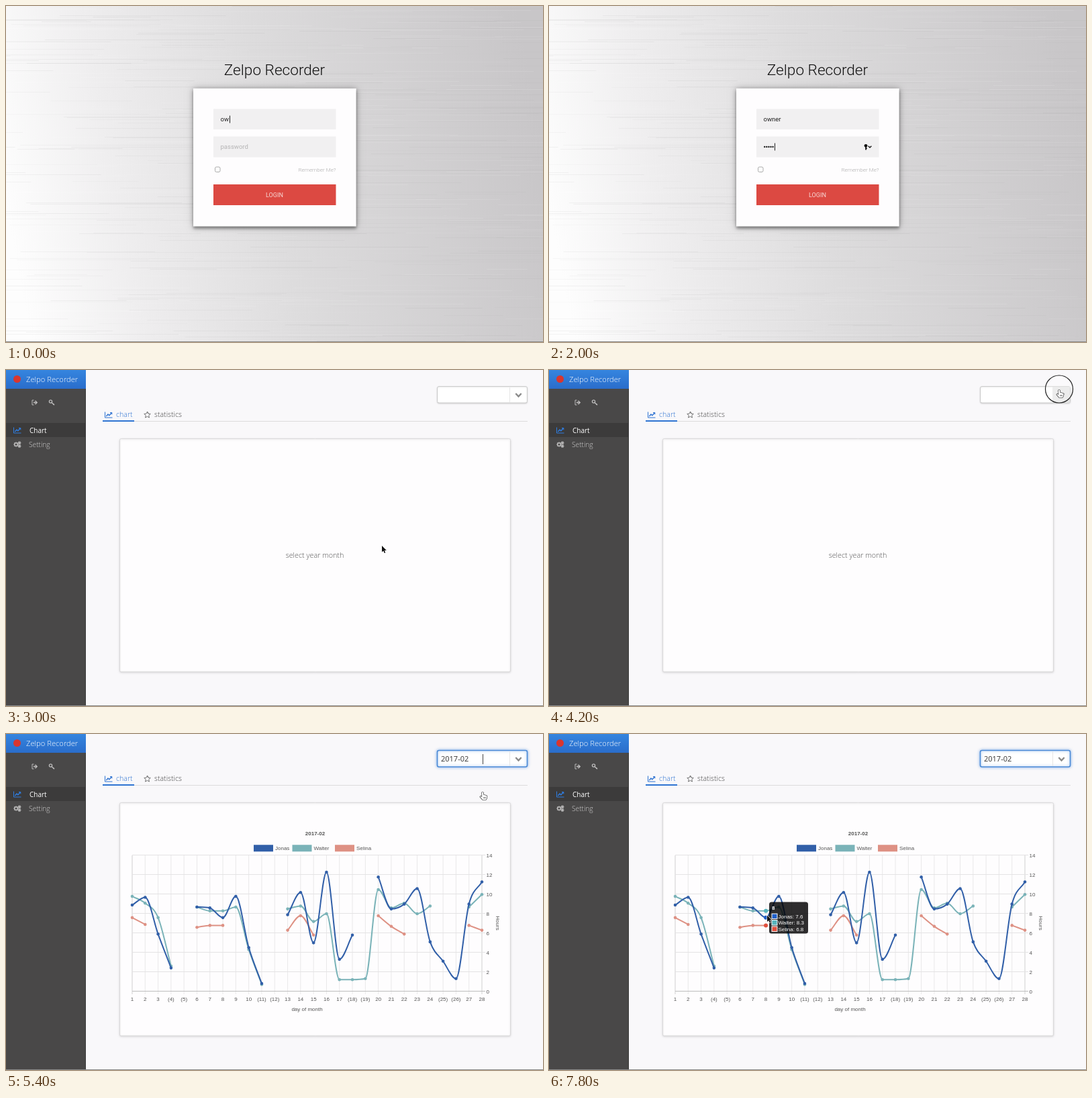
These frames come from a looping animation (800x501 px, 8 s). An HTML page with a canvas:

```html
<!DOCTYPE html>
<html lang="en">
<head>
<meta charset="utf-8">
<title>Zelpo Recorder</title>
<style>
html, body { margin: 0; width: 100%; height: 100%; overflow: hidden; background: #f9f9fa; }
canvas { display: block; }
</style>
</head>
<body>
<canvas id="stage" width="800" height="501"></canvas>
<script>
const ctx = document.getElementById('stage').getContext('2d');
const LOOP = 8000, STEP = 200, TAU = Math.PI * 2;
const APP = 'Zelpo Recorder', USER = 'owner', MONTH = '2017-02';
const ROBOTO = 'Roboto, sans-serif', OPEN = '"Open Sans", sans-serif';
const ARIAL = '"Liberation Sans", Arial, sans-serif';

const rect = (x, y, w, h, fill) => { ctx.fillStyle = fill; ctx.fillRect(x, y, w, h); };

function box(x, y, w, h, r, fill, stroke, lw = 1) {
  ctx.beginPath();
  ctx.roundRect(x, y, w, h, r);
  if (fill) { ctx.fillStyle = fill; ctx.fill(); }
  if (stroke) { ctx.strokeStyle = stroke; ctx.lineWidth = lw; ctx.stroke(); }
}

function text(s, x, y, font, fill, align = 'left') {
  ctx.font = font;
  ctx.fillStyle = fill;
  ctx.textAlign = align;
  ctx.fillText(s, x, y);
  return ctx.measureText(s).width;
}

function line(points, color, lw = 1) {
  ctx.beginPath();
  for (let i = 0; i < points.length; i += 2) ctx.lineTo(points[i], points[i + 1]);
  ctx.strokeStyle = color;
  ctx.lineWidth = lw;
  ctx.stroke();
}

function dot(x, y, r, fill, stroke, lw = 1) {
  ctx.beginPath();
  ctx.arc(x, y, r, 0, TAU);
  if (fill) { ctx.fillStyle = fill; ctx.fill(); }
  if (stroke) { ctx.strokeStyle = stroke; ctx.lineWidth = lw; ctx.stroke(); }
}

function shadow(color, blur, dy = 0) {
  ctx.shadowColor = color;
  ctx.shadowBlur = blur;
  ctx.shadowOffsetY = dy;
}
const noShadow = () => shadow('transparent', 0);

// Linear interpolation through rows of [time, ...values]
function track(keys, t) {
  let i = 0;
  while (i < keys.length - 2 && t > keys[i + 1][0]) i++;
  const a = keys[i], b = keys[i + 1];
  const k = Math.min(1, Math.max(0, (t - a[0]) / (b[0] - a[0])));
  return a.slice(1).map((v, j) => v + (b[j + 1] - v) * k);
}

// ---- Login ----

function brushed() {
  const g = ctx.createLinearGradient(0, 300, 790, 150);
  g.addColorStop(0, '#fdfdfd');
  g.addColorStop(0.2, '#efeeef');
  g.addColorStop(0.5, '#dddcdd');
  g.addColorStop(1, '#c8c6c8');
  rect(0, 0, 800, 501, g);
  let seed = 11;
  const rnd = () => (seed = seed * 16807 % 2147483647) / 2147483647;
  for (let i = 0; i < 420; i++) {
    const shade = rnd() < 0.5 ? 255 : 150;
    rect(rnd() * 900 - 150, Math.floor(rnd() * 500), 60 + rnd() * 260, 1,
      `rgba(${shade},${shade},${shade},${0.03 + rnd() * 0.09})`);
  }
}

function login(t) {
  brushed();
  text(APP, 400, 103, '300 22.6px ' + ROBOTO, '#111', 'center');
  shadow('rgba(0,0,0,.3)', 10);
  rect(279, 123, 242.5, 205.5, '#fff');
  shadow('rgba(0,0,0,.35)', 4, 3);
  rect(279, 123, 242.5, 205.5, '#fefdfe');
  noShadow();
  rect(309, 153.5, 182.5, 30.5, '#f1f0f1');
  rect(309, 194.5, 182.5, 31, '#f1f0f1');

  const font = '400 9.5px ' + ROBOTO;
  const typed = t < 200 ? 2 : t < 400 ? 3 : 5;
  const inPass = t >= 800;
  const w = text(USER.slice(0, typed), 319.5, 172, font, '#222');
  let caretX = 320 + w, caretY = 163.5;
  if (inPass) {
    const dots = t < 1000 ? 0 : t < 1200 ? 1 : Math.min(5, (t - 600) / 200);
    for (let i = 0; i < dots; i++) dot(321.2 + i * 3.1, 210, 1.2, '#222');
    caretX = 320 + dots * 3.1;
    caretY = 204.5;
    keyBadge();
    if (!dots) text('password', 319.5, 213, font, '#b5b4b5');
  } else {
    text('password', 319.5, 213, font, '#b5b4b5');
  }
  rect(Math.round(caretX), caretY, 1, 11, '#222');

  box(311.5, 240, 7.5, 7.5, 2, '#fff', '#aaa');
  text('Remember Me?', 491.5, 246.7, '300 8.1px ' + ROBOTO, '#aaa9aa', 'right');
  rect(309, 266, 182.5, 31, '#dc4942');
  text('LOGIN', 400, 285, '400 9.1px ' + ROBOTO, '#f8d9d7', 'center');
}

function keyBadge() {
  dot(472, 208.3, 2.4, '#111');
  rect(471.2, 209, 1.8, 5.5, '#111');
  rect(472.5, 211.6, 1.4, 1.2, '#111');
  line([475.6, 208.8, 478, 211, 480.4, 208.8], '#111', 1.3);
}

function spinner(t) {
  rect(0, 0, 800, 501, '#f9f9fa');
  rect(390, 209, 20, 29, '#fff');
  const turn = (t - 2200) / STEP * 3;
  for (let i = 0; i < 12; i++) {
    const a = Math.PI / 2 - (i - turn) * TAU / 12;
    const c = Math.cos(a), s = Math.sin(a);
    line([400 + c * 4.6, 225 + s * 4.6, 400 + c * 8.8, 225 + s * 8.8],
      `rgba(0,0,0,${Math.max(0.2, 1 - i * 0.085)})`, 1.5);
  }
}

// ---- Dashboard ----

function chartIcon(x, y, c) {
  line([x, y, x, y + 8.5, x + 11, y + 8.5], c);
  line([x + 1.8, y + 6.5, x + 4.5, y + 3.5, x + 6.3, y + 5.2, x + 10, y + 1.3], c, 1.5);
  line([x + 7.5, y + 1, x + 10.3, y + 1, x + 10.3, y + 3.8], c);
}

function gear(x, y, r, c) {
  dot(x, y, r, null, c, 1.5);
  for (let i = 0; i < 8; i++) {
    const a = i * TAU / 8;
    rect(x + Math.cos(a) * (r + 1) - 0.5, y + Math.sin(a) * (r + 1) - 0.5, 1, 1, c);
  }
}

function star(x, y, r, c) {
  const pts = [];
  for (let i = 0; i <= 11; i++) {
    const a = i * TAU / 10 - Math.PI / 2, q = i % 2 ? r * 0.47 : r;
    pts.push(x + Math.cos(a) * q, y + Math.sin(a) * q);
  }
  line(pts, c, 0.9);
}

function sidebar() {
  rect(0, 0, 119, 501, '#494848');
  const g = ctx.createLinearGradient(0, 0, 0, 28);
  g.addColorStop(0, '#3585df');
  g.addColorStop(1, '#2a6dcb');
  rect(0, 0, 119, 28, g);
  rect(0, 79, 119, 21, '#3c3b3b');
  rect(118, 28, 1, 473, '#3a3a3a');
  dot(16.5, 13.5, 5.5, '#d9362f');
  text(APP, 30, 17.7, '300 11.2px ' + OPEN, '#fff');
  const c = '#bdbcbc';
  line([41.5, 45, 39, 45, 39, 52, 41.5, 52], c);
  line([41, 48.5, 46, 48.5], c, 1.8);
  line([43.5, 45.7, 46.3, 48.5, 43.5, 51.3], c, 1.3);
  dot(66.5, 47, 2.1, null, c, 1.3);
  line([68, 48.5, 72, 52.3], c, 1.4);
  line([70, 52, 71.4, 50.6], c);
  chartIcon(11.5, 85.5, '#2f7de0');
  text('Chart', 35, 93.5, '400 10px ' + OPEN, '#fff');
  gear(15, 111, 2.3, c);
  gear(20, 108.7, 1, c);
  gear(20, 113.5, 1, c);
  text('Setting', 34, 114.5, '300 10.2px ' + OPEN, '#d0cfcf');
}

function select(t) {
  const focus = t >= 4400;
  shadow(focus ? 'rgba(60,130,220,.55)' : 'rgba(0,0,0,.12)', focus ? 4 : 2, focus ? 0 : 1);
  box(642.5, 24.5, 134, 24.5, 2.5, '#fff', focus ? '#4b8ad6' : '#ccc', focus ? 1.6 : 1);
  noShadow();
  const hover = t >= 4000 && t < 4400;
  if (hover) rect(750, 25, 26, 23.5, '#e4e4e4');
  rect(750, 26, 1, 22, '#e6e6e6');
  line([759.3, 35, 763.5, 39.4, 767.7, 35], '#8c8c8c', 2.4);
  if (t >= 4800) text(MONTH, 648, 41, '400 11px ' + OPEN, '#333');
  if (t >= 4400 && t < 4800 || t === 5400) rect(710, 30, 1, 15, '#444');
}

function menu(t) {
  shadow('rgba(0,0,0,.2)', 4, 2);
  box(642.5, 51.5, 134, 104, 2.5, '#fff', '#ccc');
  noShadow();
  const over = t < 4600 ? 0 : 1;
  for (let i = 0; i < 4; i++) {
    const y = 52 + i * 26;
    if (i === over) rect(643, y, 133, 26, '#e8f0fa');
    text(i < 3 ? '2017-0' + (3 - i) : '2016-12', 648, y + 17, '400 11px ' + OPEN, '#444');
  }
}

function dashboard(t) {
  rect(0, 0, 800, 501, '#f9f8fa');
  sidebar();
  rect(144, 76, 633, 1, '#dcdbdc');
  rect(144, 75, 47, 2, '#2f74d2');
  chartIcon(147.5, 62.5, '#2f74d2');
  text('chart', 164, 70, '300 10.6px ' + OPEN, '#2f74d2');
  star(210.5, 67, 5, '#666');
  text('statistics', 221, 70, '300 10.6px ' + OPEN, '#444');
  shadow('rgba(0,0,0,.12)', 3, 1);
  box(169.5, 102.5, 582, 347.5, 2, '#fefdfe', '#dad9da');
  noShadow();
  if (t < 4800) text('select year month', 460, 280, '300 10.8px ' + OPEN, '#555', 'center');
  else chart(t);
  select(t);
  if (t >= 4400 && t < 4800) menu(t);
}

// ---- Chart ----

const series = [
  { name: 'Jonas', key: 369, color: '#315fa8', hot: '#1f5ec8', runs: [
    [1, 8.9, 9.7, 5.9, 2.4], [6, 8.7, 8.6, 7.6, 9.8, 4.5, 0.8],
    [13, 7.9, 10.2, 5, 12.3, 3.3, 5.8],
    [20, 11.8, 8.5, 9, 10.6, 5.1, 3.1, 1.3, 9, 11.3]] },
  { name: 'Walter', key: 426.5, color: '#7ab3b8', hot: '#56b4bd', runs: [
    [1, 9.8, 9.1, 7.6, 2.6], [6, 8.7, 8.3, 8.3, 8.7, 4.3, 0.7],
    [13, 8.5, 8.8, 7.2, 8, 1.2, 1.2, 1.3, 10.5, 8.6, 9.1, 8, 8.8],
    [27, 8.7, 10]] },
  { name: 'Selina', key: 490, color: '#de9184', hot: '#e0503e', runs: [
    [1, 7.6, 6.9], [6, 6.6, 6.8, 6.8], [13, 6.3, 7.8, 5.8],
    [20, 7.8, 6.7, 5.9], [27, 6.8, 6.3]] }
];
const OFF = [4, 5, 11, 12, 18, 19, 25, 26];
const DX = 521 / 27;
const dayX = d => 188 + (d - 1) * DX;
const hourY = v => 383.5 - v * 14.43;

function valueOn(s, day) {
  for (const [first, ...vals] of s.runs)
    if (day >= first && day < first + vals.length) return vals[day - first];
}

// Monotone cubic: flat at local extremes, limited slope elsewhere
function slopes(ys) {
  const d = ys.slice(1).map((y, i) => y - ys[i]);
  const m = ys.map((_, i) =>
    i === 0 ? d[0] : i === d.length ? d[i - 1] : d[i - 1] * d[i] <= 0 ? 0 : (d[i - 1] + d[i]) / 2);
  d.forEach((dk, i) => {
    if (!dk) { m[i] = m[i + 1] = 0; return; }
    const a = m[i] / dk, b = m[i + 1] / dk, q = a * a + b * b;
    if (q > 9) {
      const k = 3 / Math.sqrt(q);
      m[i] = a * k * dk;
      m[i + 1] = b * k * dk;
    }
  });
  return m;
}

function drawSeries(s, grow, day) {
  for (const [first, ...vals] of s.runs) {
    const ys = vals.map(v => hourY(v * grow)), m = slopes(ys);
    ctx.beginPath();
    ys.forEach((y, i) => {
      const x = dayX(first + i);
      if (!i) ctx.moveTo(x, y);
      else ctx.bezierCurveTo(x - DX * 2 / 3, ys[i - 1] + m[i - 1] / 3, x - DX / 3, y - m[i] / 3, x, y);
    });
    ctx.strokeStyle = s.color;
    ctx.lineWidth = 2;
    ctx.stroke();
    ys.forEach((y, i) => {
      const hot = first + i === day;
      dot(dayX(first + i), y, hot ? 3 : 2.3, hot ? s.hot : s.color);
    });
  }
}

function axes() {
  const font = '8px ' + ARIAL, ink = '#555';
  for (let d = 1; d <= 28; d++) {
    const x = dayX(d);
    line([x, 181, x, 388], d === 1 || d === 28 ? '#cfcfcf' : '#e9e8e9');
    text(OFF.includes(d) ? `(${d})` : d, x, 398, font, ink, 'center');
  }
  for (let v = 0; v <= 14; v += 2) {
    const y = Math.round(hourY(v)) - 0.5;
    line([188, y, 714, y], v ? '#e4e3e4' : '#bdbdbd');
    text(v, 715.5, y + 3, font, ink);
  }
  text('day of month', 448.5, 413, font, ink, 'center');
  ctx.save();
  ctx.translate(730, 282);
  ctx.rotate(Math.PI / 2);
  text('Hours', 0, 0, font, ink, 'center');
  ctx.restore();
  text(MONTH, 460.5, 151, 'bold 8px ' + ARIAL, ink, 'center');
  for (const s of series) {
    rect(s.key, 165.3, 29, 10, s.color);
    text(s.name, s.key + 32, 173, font, ink);
  }
}

// [time, left, middle of tooltip]
const tipPath = [[6400, 367, 319], [6600, 356.5, 279.5], [6800, 347.5, 250], [7200, 347.5, 250],
  [7400, 334, 267], [7600, 328, 274], [8000, 328, 274]];
const hoverDay = t => t < 6400 ? 0 : t < 6600 ? 10 : t < 7400 ? 9 : 8;

function tooltip(t, day) {
  const rows = series.filter(s => valueOn(s, day) !== undefined);
  const [x, mid] = track(tipPath, t);
  const h = 18.5 + rows.length * 9.5, y = mid - h / 2;
  const dark = 'rgba(0,0,0,.82)';
  box(x, y, 58, h, 3.5, dark);
  ctx.beginPath();
  ctx.moveTo(x, mid - 4);
  ctx.lineTo(x - 4, mid);
  ctx.lineTo(x, mid + 4);
  ctx.fill();
  text(day, x + 4, y + 11.5, 'bold 8px ' + ARIAL, '#fff');
  rows.forEach((s, i) => {
    const ry = y + 17 + i * 9.5;
    rect(x + 3.5, ry, 9, 8.5, '#fff');
    rect(x + 4.5, ry + 1, 7, 6.5, s.hot);
    text(`${s.name}: ${valueOn(s, day).toFixed(1)}`, x + 13.5, ry + 7, '8px ' + ARIAL, '#fff');
  });
}

function chart(t) {
  axes();
  const k = Math.min(1, (t - 4700) / 700), day = hoverDay(t);
  const grow = 1 - Math.pow(1 - k, 4);
  for (const s of [...series].reverse()) drawSeries(s, grow, day);
  if (day) tooltip(t, day);
}

// ---- Pointer ----

const pointerPath = [[3000, 560, 262], [3400, 632, 172], [3800, 738, 55], [4000, 760, 30], [4400, 760, 30],
  [4600, 722, 76], [4800, 710, 87], [5400, 710, 87], [5800, 620, 150], [6200, 420, 288],
  [6400, 361, 317], [6600, 343, 261], [7200, 343, 260], [7400, 328, 270], [7600, 325, 270.5], [8000, 325, 270.5]];

function shape(x, y, pts, fill, stroke) {
  ctx.beginPath();
  for (let i = 0; i < pts.length; i += 2) ctx.lineTo(x + pts[i], y + pts[i + 1]);
  ctx.closePath();
  ctx.lineJoin = 'round';
  ctx.strokeStyle = stroke;
  ctx.lineWidth = 1.2;
  ctx.stroke();
  ctx.fillStyle = fill;
  ctx.fill();
  ctx.lineJoin = 'miter';
}

function pointer(t) {
  const [x, y] = track(pointerPath, t);
  if (t === 4200 || t === 4800) dot(x, y - 1.5, 20.5, 'rgba(255,255,255,.3)', '#222', 1.2);
  if (t >= 4000 && t <= 5400) {
    shape(x, y, [-1, 0, 1, 0, 1.6, 4, 4, 4.2, 6.6, 5.2, 6.4, 8.5, 5, 11, 0, 11, -3.8, 6.5, -2.8, 5.6, -0.8, 7], '#fff', '#222');
    line([x + 2, y + 7, x + 2, y + 9.2], '#222', 0.8);
    line([x + 4, y + 7, x + 4, y + 9.2], '#222', 0.8);
  } else {
    shape(x, y, [0, 0, 0, 9.6, 2.2, 7.6, 3.7, 11, 5.3, 10.3, 3.8, 7, 6.8, 7], '#111', '#fff');
  }
}

function draw(t) {
  if (t < 2200) login(t);
  else if (t < 2800) spinner(t);
  else dashboard(t);
  if (t >= 3000) pointer(t);
  rect(0, 500, 800, 1, '#8a8a8a');
}

let start, shown = -1;
function tick(now) {
  start ??= now;
  const t = Math.floor((now - start) % LOOP / STEP) * STEP;
  if (t !== shown) draw(shown = t);
  requestAnimationFrame(tick);
}
requestAnimationFrame(tick);
</script>
</body>
</html>
```
